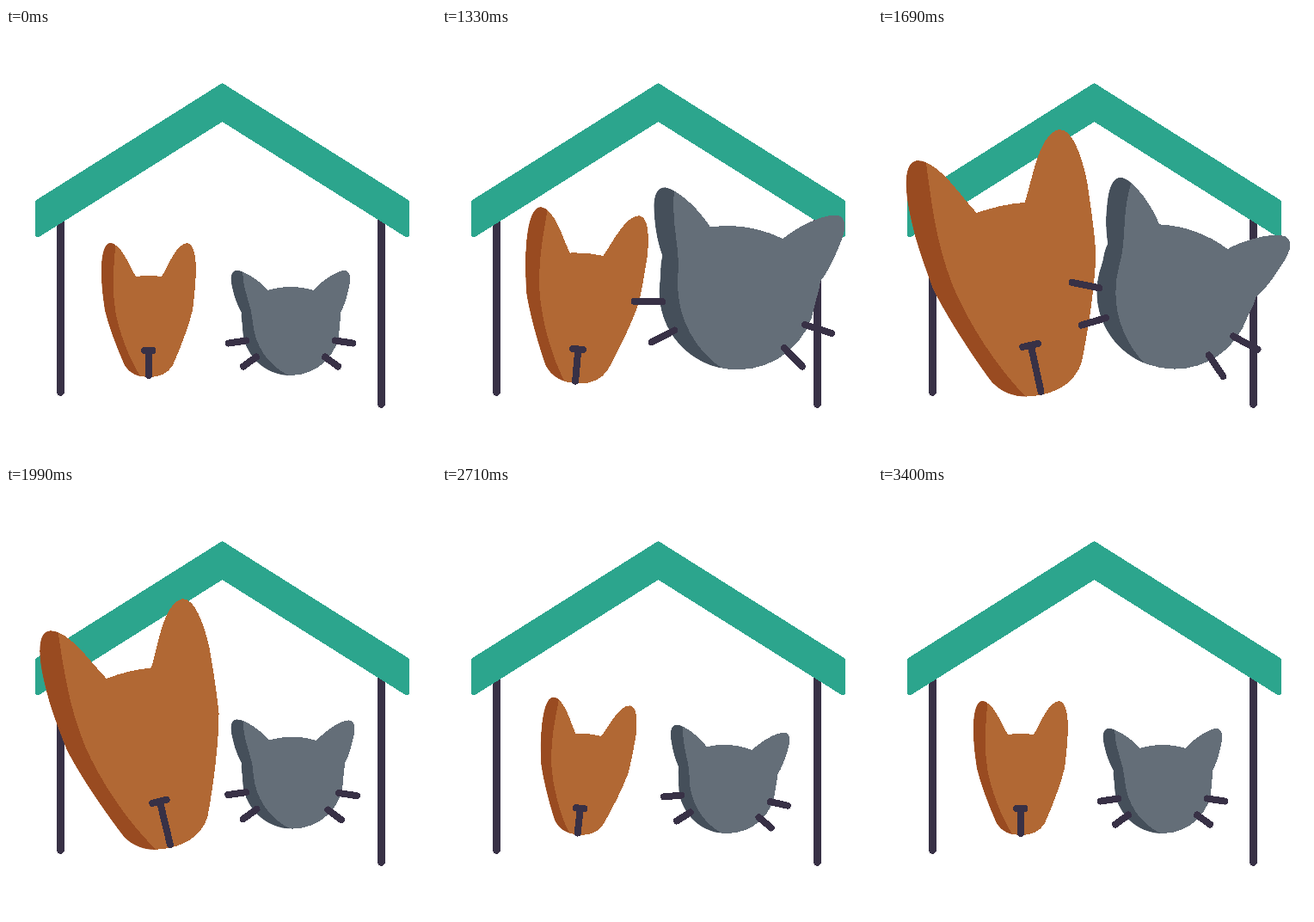
Write an HTML page that moves like this. It is 500 px wide and 500 px high and loops after 3430 ms.

```html
<!DOCTYPE html>
<html lang="en">
<head>
<meta charset="utf-8">
<title>Pet shelter</title>
<style>
  html, body { margin: 0; width: 100%; height: 100%; overflow: hidden; background: #fff; }
  svg { display: block; width: 100%; height: 100%; shape-rendering: crispEdges; }
  .line { fill: none; stroke: #383146; stroke-width: 8; stroke-linecap: round; }
  .line path { vector-effect: non-scaling-stroke; }
  .post { stroke-width: 8.5; }
</style>
</head>
<body>
<svg viewBox="0 0 500 500">
  <defs>
    <path id="dogShape" d="M151 289Q166 287 181 289C188 278 198 250 211 250C219 251 221 268 221 284
      C220 300 219 313 217 328C213 345 203 372 194 392C188 402 178 406 166 406
      C154 406 144 402 138 392C129 372 119 345 115 328C113 313 111 300 111 284
      C111 268 113 251 121 250C134 250 144 278 151 289Z"/>
    <path id="catShape" d="M304.500 305Q331 297 357.500 305C366 295 384 282 394 282C402 283 401 294 398 305
      C396 314 393 324 389 331C389.500 338 388 342 388 347C388 380 362 404 331 404
      C301 404 275 380 275 347C275 342 273 338 274 331C270 324 266 314 264 305
      C261 294 260 283 268 282C278 282 296 295 304.500 305Z"/>
    <clipPath id="dogClip"><use href="#dogShape"/></clipPath>
    <clipPath id="catClip"><use href="#catShape"/></clipPath>
  </defs>

  <path class="line post" d="M63.500 215V423.500M436.500 215V437.500"/>
  <path d="M251.500 67.500L466 202.500V240.300L251.500 105.500L37 240.300V202.500Z"
    fill="#2ca58d" stroke="#2ca58d" stroke-width="6" stroke-linejoin="round"/>

  <g id="dog">
    <use href="#dogShape" fill="#b16834"/>
    <path clip-path="url(#dogClip)" fill="#994b21"
      d="M128 245C125 280 123 300 127 328C131 352 143 385 157 406H100V245Z"/>
    <g class="line"><path d="M161 375H170.500M166 375V404"/></g>
  </g>
  <g id="cat">
    <use href="#catShape" fill="#646e78"/>
    <path clip-path="url(#catClip)" fill="#454f5a"
      d="M275 275C273 302 286 322 287 342C289 370 306 394 331 405H250V275Z"/>
    <g class="line">
      <path d="M259 366.500L279 363.500M276 393.500L291 382.500M403 366.500L383 363.500M386 393.500L371 382.500"/>
    </g>
  </g>
</svg>
<script>
const LOOP = 3430, STEP = 30, OFFSET = 10;
const dog = document.getElementById('dog');
const cat = document.getElementById('cat');

function ease(u) {
  u = Math.min(1, Math.max(0, u));
  return u * u * (3 - 2 * u);
}

// Rises from 0 to 1 between start and peak, falls back to 0 at end
const pulse = (t, start, peak, end) =>
  ease((t - start) / (peak - start)) - ease((t - peak) / (end - peak));

// Alternating swings, each half as wide as the one before
const swing = (t, peak, half) => [0, 1, 2].reduce((sum, n) => {
  const top = peak + n * half;
  return sum + (-0.5) ** n * pulse(t, top - half, top, top + half);
}, 0);

function place(node, cx, cy, dx, dy, size, turn) {
  node.setAttribute('transform',
    `translate(${cx + dx} ${cy + dy}) rotate(${turn}) scale(${size}) translate(${-cx} ${-cy})`);
}

function drawDog(t) {
  const lift = pulse(t, 1060, 1810, 2560);
  const size = 1 + 0.97 * pulse(t, 1060, 1810, 2450);
  const turn = 5 * pulse(t, 1060, 1330, 1820) - 16 * pulse(t, 1330, 1820, 2650)
    + 6.5 * pulse(t, 1820, 2650, 3200);
  place(dog, 166, 328, -8 * lift, -50 * lift, size, turn);
}

function drawCat(t) {
  const lift = pulse(t, 1000, 1480, 2150);
  const size = 1 + 0.8 * lift - 0.09 * pulse(t, 1480, 2150, 2700);
  place(cat, 331, 350, 15 * lift, -52 * lift, size, 20.5 * swing(t, 1640, 580));
}

function draw() {
  const now = performance.now() % LOOP;
  const t = Math.floor((now - OFFSET) / STEP) * STEP + OFFSET;
  drawDog(t);
  drawCat(t);
  requestAnimationFrame(draw);
}
draw();
</script>
</body>
</html>
```
